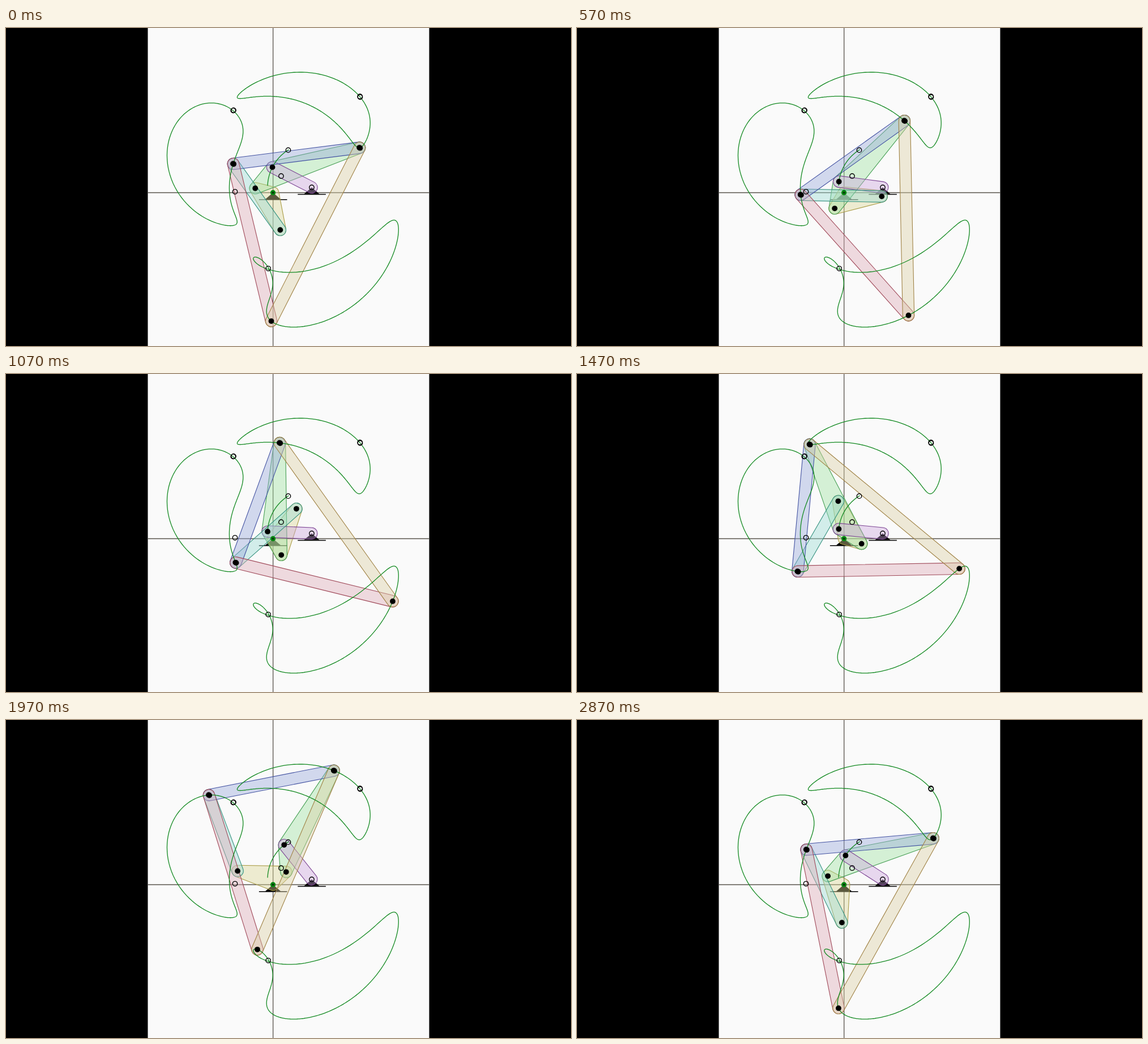
An HTML page for the animation above (2910 ms loop, 998 by 561 pixels).

```html
<!DOCTYPE html>
<html lang="en">
<head>
<meta charset="utf-8">
<title>Linkage</title>
<style>
  html, body { margin: 0; width: 100%; height: 100%; overflow: hidden; background: #000; }
  svg { display: block; width: 998px; height: 561px; }
  .link { fill-opacity: .42; stroke-width: 1.1; stroke-linejoin: round; }
  .trace { fill: none; stroke: #148a22; stroke-width: 1.3; }
  .ring { fill: none; stroke: #000; stroke-width: 1.4; }
</style>
</head>
<body>
<svg id="stage" viewBox="0 0 998 561">
  <rect x="250.5" width="497" height="561" fill="#fafafa"/>
  <path d="M471.7 0V561M250.5 290.5H747.5" stroke="#56524a" stroke-width="1.3"/>
</svg>
<script>
const LOOP = 2910, STEP = 100 / 3, LAST = 86, RADIUS = 10.2;
const O = [471.6, 290.5], G = [540, 281.2];

// [step, crank angle in degrees]
const KEYS = [[0, 79], [17, 5.7], [32, -51.9], [44, -98.8], [59, -158.9], [73, -212.5], [86, -266.8]];

const stage = document.getElementById('stage');

function add(tag, attrs) {
  const el = document.createElementNS('http://www.w3.org/2000/svg', tag);
  for (const name in attrs) el.setAttribute(name, attrs[name]);
  return stage.appendChild(el);
}

function polar([x, y], r, degrees) {
  const a = degrees * Math.PI / 180;
  return [x + r * Math.cos(a), y + r * Math.sin(a)];
}

// Intersection of two circles, on the chosen side of a -> b.
function meet(a, ra, b, rb, side) {
  const dx = b[0] - a[0], dy = b[1] - a[1], d = Math.hypot(dx, dy);
  const along = (ra * ra - rb * rb + d * d) / (2 * d);
  const off = side * Math.sqrt(Math.max(0, ra * ra - along * along));
  return [a[0] + (along * dx - off * dy) / d, a[1] + (along * dy + off * dx) / d];
}

function solve(angle) {
  const A = polar(O, 32.3, angle + 114.9);
  const B = polar(O, 67, angle);
  const P = meet(A, 47.9, G, 78, -1);
  const Q = meet(A, 197.7, P, 157.8, 1);
  const R = meet(Q, 225, B, 143.2, 1);
  const S = meet(R, 285.5, Q, 343.3, 1);
  return { O, G, A, B, P, Q, R, S };
}

const fmt = p => p.map(v => v.toFixed(2)).join(' ');

// Rounded outline around clockwise points.
function outline(points) {
  const edges = points.map((p, i) => {
    const q = points[(i + 1) % points.length];
    const dx = q[0] - p[0], dy = q[1] - p[1], k = RADIUS / Math.hypot(dx, dy);
    return [p, q].map(([x, y]) => fmt([x + dy * k, y - dx * k]));
  });
  const arc = `A${RADIUS} ${RADIUS} 0 0 1 `;
  return 'M' + edges[0][0] + edges.map(([, end], i) =>
    'L' + end + arc + edges[(i + 1) % edges.length][0]).join('') + 'Z';
}

function addAnchor([x, y]) {
  add('path', { d: `M${x} ${y}l13.5 11.5h-27z` });
  add('path', { d: `M${x - 24.7} ${y + 12.2}h49.6`, stroke: '#000', 'stroke-width': 1.5 });
}

const links = [];
function addLink(names, fill, stroke) {
  links.push({ names: [...names], el: add('path', { class: 'link', fill, stroke }) });
}

addAnchor(O);
addAnchor(G);
addLink('OBA', '#d8d494', '#aa9c46');
addLink('APQ', '#9de1a0', '#479f55');
addLink('PG', '#caa4dc', '#7d4594');
addLink('BR', '#98dad2', '#35927f');
addLink('QR', '#96a8d8', '#4453a2');
addLink('RS', '#dcaab6', '#a04a5a');
addLink('QS', '#d8cca2', '#a08346');

const poses = Array.from({ length: 361 }, (_, i) => solve(i));
for (const name of 'PQRS')
  add('path', { class: 'trace', d: 'M' + poses.map(pose => fmt(pose[name])).join('L') });

const design = [G, [486, 261.2], [498.5, 215.4], [404.5, 288.8], [463.2, 424.3],
  [625.2, 120.7], [625.5, 121.8], [402, 145.1], [401.3, 145.6]];
for (const [cx, cy] of design) add('circle', { class: 'ring', cx, cy, r: 4.2 });

add('circle', { cx: O[0], cy: O[1], r: 3.4, fill: '#063a0a', stroke: '#0a8a14', 'stroke-width': 2.6 });

// Q and R carry two pins that nearly coincide.
const dots = [...'ABPSQR'].map(name => ({ name, shift: /[QR]/.test(name) ? -.4 : 0 }))
  .concat([{ name: 'Q', shift: .8 }, { name: 'R', shift: .8 }]);
for (const dot of dots) dot.el = add('circle', { r: 4.9 });

function angleAt(step) {
  const i = Math.max(1, KEYS.findIndex(key => key[0] >= step));
  const [s0, a0] = KEYS[i - 1], [s1, a1] = KEYS[i];
  return a0 + (a1 - a0) * (step - s0) / (s1 - s0);
}

function draw(time) {
  const step = Math.min(LAST, Math.floor((time % LOOP + 5) / STEP));
  const pose = solve(angleAt(step));
  for (const { names, el } of links) el.setAttribute('d', outline(names.map(n => pose[n])));
  for (const { name, shift, el } of dots) {
    el.setAttribute('cx', pose[name][0] + shift);
    el.setAttribute('cy', pose[name][1] + shift / 2);
  }
}

const start = performance.now();
function tick() {
  draw(performance.now() - start);
  requestAnimationFrame(tick);
}
draw(0);
requestAnimationFrame(tick);
</script>
</body>
</html>
```
